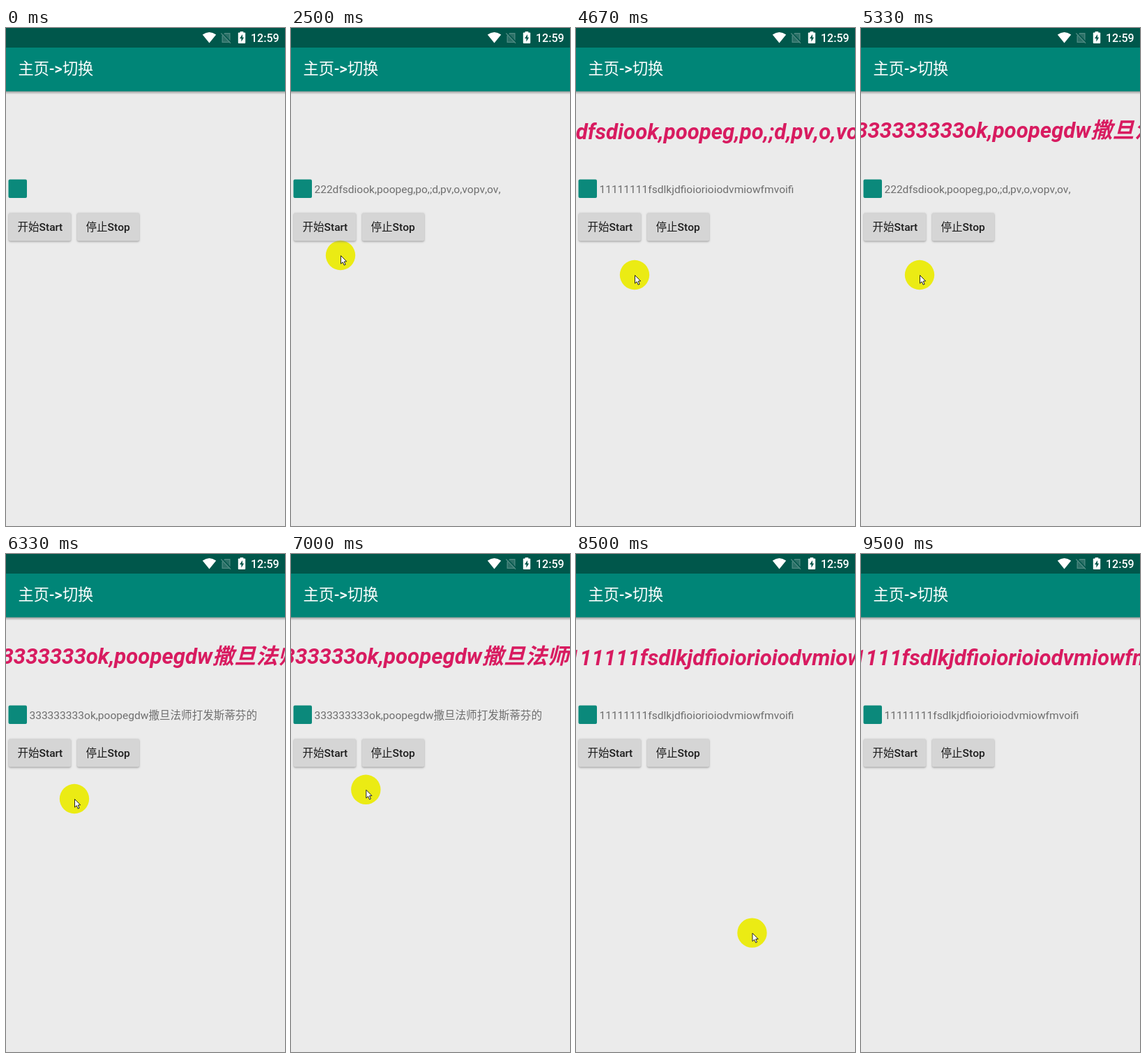
An HTML page with a canvas that plays this animation: 400 by 712 pixels, repeating every 9.67 s.

```html
<!DOCTYPE html>
<html lang="zh">
<head>
<meta charset="utf-8">
<style>
  html, body { margin: 0; width: 100%; height: 100%; overflow: hidden; background: #ebebeb; }
  canvas { display: block; width: 400px; height: 712px; }
</style>
</head>
<body>
<canvas id="stage"></canvas>
<script>
const W = 400, H = 712;
const LOOP = 9670, STEP = 500 / 3;
const DP = W / 360;
const SLIDE = 0.3;
const SCROLL = 30 * DP, SCROLL_DELAY = 0.07;
const BANNER_H = 100 * DP;

const LINES = [
  '11111111fsdlkjdfioiorioiodvmiowfmvoifi',
  '222dfsdiook,poopeg,po,;d,pv,o,vopv,ov,',
  '333333333ok,poopegdw撒旦法师打发斯蒂芬的'
];

// Both switchers show the next line every period until stopped.
const ROW = { start: 2.03, period: 1, count: 6 };
const BANNER = { start: 3.03, period: 2, count: 3 };

const STOPS = [
  { at: 0.1, x: 72, y: 290 },
  { at: 2.05, x: 71, y: 325 },
  { at: 2.5, x: 84, y: 353 },
  { at: 5.7, x: 98, y: 350 },
  { at: 6.9, x: 141, y: 289 },
  { at: 8.1, x: 340, y: 740 }
];
const CLICKS = [0.66, 1.16, 7.66];

const canvas = document.getElementById('stage');
const ctx = canvas.getContext('2d');
const ratio = window.devicePixelRatio || 1;
canvas.width = W * ratio;
canvas.height = H * ratio;

const ease = u => (1 - Math.cos(Math.PI * Math.min(1, Math.max(0, u)))) / 2;

function rect(x, y, w, h, color, radius = 0) {
  ctx.beginPath();
  ctx.roundRect(x, y, w, h, radius);
  ctx.fillStyle = color;
  ctx.fill();
}

function shape(points, color) {
  ctx.beginPath();
  points.forEach(([x, y]) => ctx.lineTo(x, y));
  ctx.closePath();
  ctx.fillStyle = color;
  ctx.fill();
}

function line(x1, y1, x2, y2, color, width) {
  ctx.beginPath();
  ctx.moveTo(x1, y1);
  ctx.lineTo(x2, y2);
  ctx.strokeStyle = color;
  ctx.lineWidth = width;
  ctx.stroke();
}

// Latin and Chinese runs carry their own weights.
function text(str, x, y, size, color, latin = '400', han = '400') {
  ctx.fillStyle = color;
  for (const run of str.match(/[\u4e00-\u9fff]+|[^\u4e00-\u9fff]+/g)) {
    const style = run >= '\u4e00' ? han : latin;
    ctx.font = `${style} ${size}px Roboto, "Noto Sans CJK SC", "Noto Sans CJK", sans-serif`;
    ctx.fontKerning = 'none';
    ctx.fillText(run, x, y);
    x += ctx.measureText(run).width;
  }
}

function wifi() {
  ctx.beginPath();
  ctx.moveTo(291.5, 21.5);
  ctx.lineTo(281.8, 9.6);
  ctx.quadraticCurveTo(291.5, 2.6, 301.2, 9.6);
  ctx.fillStyle = '#fff';
  ctx.fill();
}

function simOff() {
  const dim = '#4d8981', bar = '#00574b';
  shape([[313.5, 7], [321.5, 7], [321.5, 21], [309.5, 21], [309.5, 11]], dim);
  shape([[313.9, 8.4], [320.2, 8.4], [320.2, 19.7], [310.8, 19.7], [310.8, 11.5]], '#2b7067');
  line(309.5, 6.5, 323, 20.5, bar, 1.5);
  line(308.3, 7.5, 322, 21.7, dim, 1.3);
}

function battery() {
  rect(335.7, 5, 4.6, 3, '#fff');
  rect(332.8, 6.5, 10.4, 15.5, '#fff', 1);
  shape([[339, 9], [335, 15], [337.4, 15], [337.4, 19.6], [341.2, 13.4], [339, 13.4]], '#00574b');
}

function statusBar() {
  rect(0, 0, W, 28, '#00574b');
  wifi();
  simOff();
  battery();
  text('12:59', 351, 20.2, 16, '#fff', '500');
}

function appBar() {
  const shade = ctx.createLinearGradient(0, 90, 0, 95);
  shade.addColorStop(0, 'rgba(0,0,0,.36)');
  shade.addColorStop(1, 'rgba(0,0,0,0)');
  rect(0, 90, W, 5, shade);
  rect(0, 28, W, 62.6, '#008577');
  text('主页->切换', 17.6, 65.6, 20 * DP, '#fff', '500');
}

function button(x, label) {
  ctx.save();
  ctx.shadowColor = 'rgba(0,0,0,.35)';
  ctx.shadowBlur = 2.5 * ratio;
  ctx.shadowOffsetY = ratio;
  rect(x, 264.2, 89, 40.3, '#d5d5d5', 2);
  ctx.restore();
  text(label, x + 12.5, 290.4, 14 * DP, '#1c1c1c', '500');
}

// Draws the leaving item and the entering one; offset runs from 1 through 0 to -1.
function switcher({ start, period, count }, t, item) {
  const now = Math.min(count - 1, Math.floor((t - start) / period));
  if (now < 0) return item(-1, 0, 0);
  const since = k => t - start - k * period;
  const p = ease(since(now) / SLIDE);
  if (p < 1) item(now - 1, -p, since(now - 1));
  item(now, 1 - p, since(now));
}

const lineAt = k => (k + 1) % LINES.length;

function row(k, offset) {
  const dx = offset * W;
  rect(3.5 + dx, 216.5, 26.5, 26.5, '#0b897b', 2);
  if (k >= 0) text(LINES[lineAt(k)], 33.4 + dx, 236, 14 * DP, '#6e6e6e');
}

function banner(k, offset, since) {
  if (k < 0) return;
  const x = -Math.max(0, since - SCROLL_DELAY) * SCROLL;
  const y = (lineAt(k) === 2 ? 157.3 : 158.6) + offset * BANNER_H;
  text(LINES[lineAt(k)], x, y, 28 * DP, '#d81b60', 'italic 700', 'italic 700');
}

function banners(t) {
  ctx.save();
  ctx.beginPath();
  ctx.rect(0, 91, W, BANNER_H);
  ctx.clip();
  switcher(BANNER, t, banner);
  ctx.restore();
}

// Longer moves take longer.
function pointerAt(t) {
  const i = STOPS.findLastIndex(s => t >= s.at);
  const to = STOPS[i], from = STOPS[i - 1] || to;
  const dx = to.x - from.x, dy = to.y - from.y;
  const p = ease((t - to.at) / (0.25 + Math.hypot(dx, dy) / 1000));
  return [from.x + dx * p, from.y + dy * p];
}

function pointer(t) {
  if (t < STOPS[0].at) return;
  const [x, y] = pointerAt(t);
  ctx.globalCompositeOperation = 'difference';
  ctx.beginPath();
  ctx.arc(x, y, 21.2, 0, 7);
  ctx.fillStyle = '#00f';
  ctx.fill();
  ctx.globalCompositeOperation = 'source-over';

  if (CLICKS.some(c => t >= c && t < c + STEP / 1000)) {
    ctx.beginPath();
    ctx.arc(x, y + 1, 5, 0, 7);
    ctx.strokeStyle = '#e3202c';
    ctx.lineWidth = 2.6;
    ctx.stroke();
  }
  const arrow = [[0, 0], [0, 11.6], [2.7, 9.2], [4.7, 13.6], [6.6, 12.7], [4.7, 8.5], [8.2, 8.3]];
  shape(arrow.map(([dx, dy]) => [x + 0.5 + dx, y + 0.5 + dy]), '#fff');
  ctx.strokeStyle = '#222';
  ctx.lineWidth = 1;
  ctx.stroke();
}

function draw(t) {
  ctx.setTransform(ratio, 0, 0, ratio, 0, 0);
  rect(0, 0, W, H, '#ebebeb');
  banners(t);
  appBar();
  statusBar();
  switcher(ROW, t, row);
  button(4, '开始Start');
  button(102, '停止Stop');
  pointer(t);
}

const begin = performance.now();

// The picture advances six times a second.
function tick() {
  const now = (performance.now() - begin) % LOOP;
  const step = Math.min(57, Math.floor((now + 3.4) / STEP));
  draw(step * STEP / 1000);
  requestAnimationFrame(tick);
}
tick();
</script>
</body>
</html>
```
